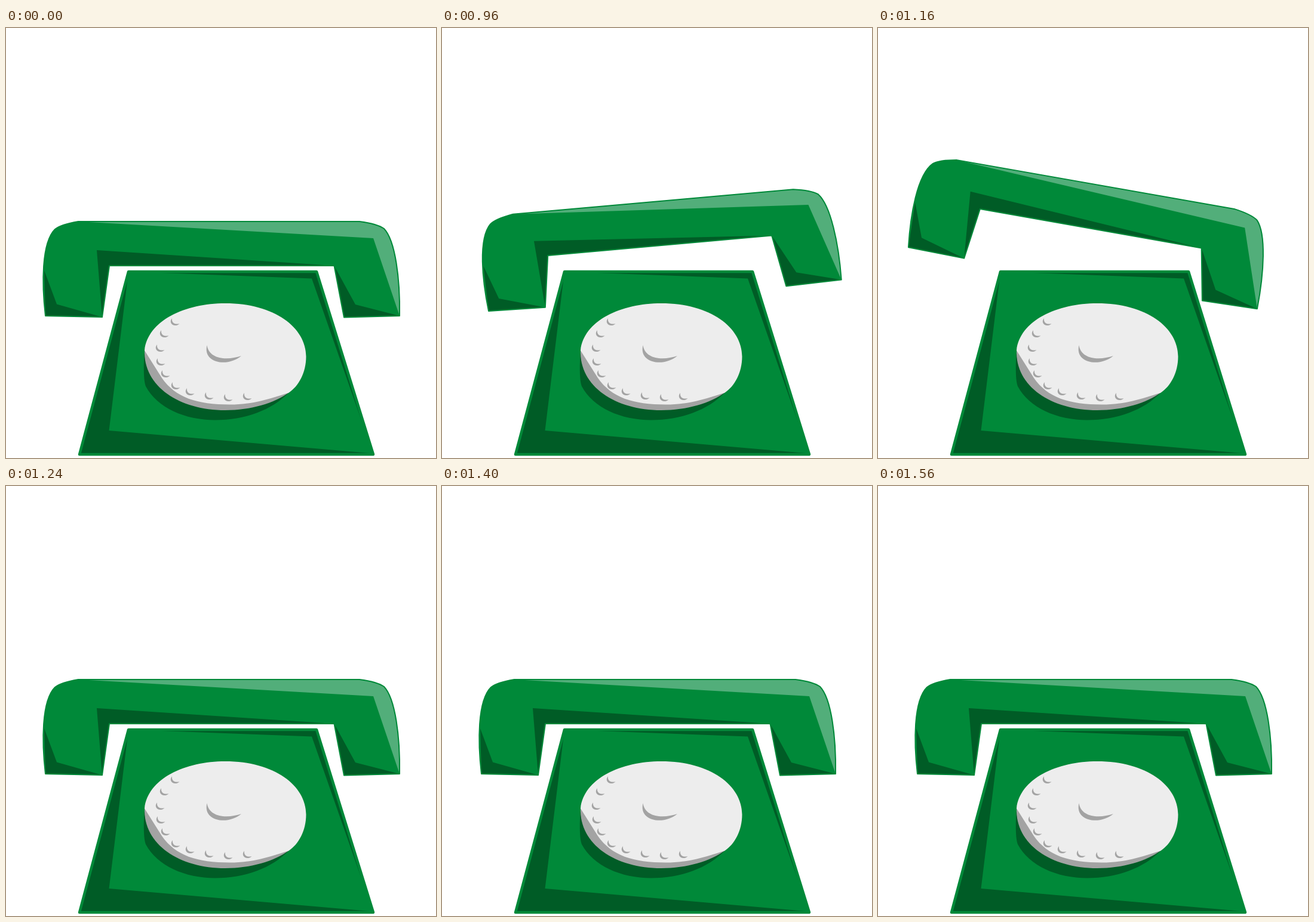
These frames come from a looping animation (720 by 720 pixels, 1920 ms). An HTML page with a canvas:

```html
<!DOCTYPE html>
<html lang="en">
<head>
<meta charset="utf-8">
<title>Ringing telephone</title>
<style>
  html, body { margin: 0; width: 100%; height: 100%; overflow: hidden; background: #fff; }
  canvas { display: block; width: 720px; height: 720px; }
</style>
</head>
<body>
<canvas id="stage" width="720" height="720"></canvas>
<script>
const ctx = document.getElementById('stage').getContext('2d');
const GREEN = '#008939', DARK = '#005c26', LIGHT = '#52ae7a';
const FACE = '#ededed', GREY = '#a3a3a3';

const LOOP = 1920, STEP = 40, RING_START = 920, RING_END = 1560;
const PIVOT = { x: 360.5, y: 404 };
// Extreme poses of the handset: degrees and offset from rest.
const SWINGS = [
  { angle: -10.15, dx: 8, dy: -67.4 },
  { angle: 10, dx: -6, dy: -62.5 }
];

const BASE = new Path2D('M205 408H520L615 714H123Z');
const BASE_SHADE = new Path2D('M205 408L172.500 674L615 712.500L123 713ZM207 408L512 419.500L614 711L520 409Z');

const SHADOW = new Path2D('M231.500 545C230.500 565 230 590 234 600C253 636 300 656.500 350 656.500C400 656.500 445 640 474 610Z');
const RIM = new Path2D('M232 540C230 600 290 640 367 640C410 640 450 628 474 610L367 500Z');
const DIAL = new Path2D('M232 540C237 490 300 461 367 461C450 461 502.500 502 502.500 550C502.500 577 490 600 473 611C440 621 415 630.500 375 630.500C320 630.500 284 619 261 586Z');
const KNOB = new Path2D('M336.500 531C329 562 372 568 394 549C370 557 340 555 336.500 531Z');
const HOLE = new Path2D('M-5 -6C-12 2 -1 11 7.500 3C0 5 -6 2 -5 -6Z');
const HOLES = [
  [283, 492], [265, 512], [258, 536], [259, 559], [267, 579],
  [284, 599], [308, 609], [340, 616], [372, 619], [404, 617]
];

const HANDSET = new Path2D('M66 482C60 430 59 360 82 337Q92 329 121 324H592Q622 328 633 336C652 356 660 420 659 482L566 484.500L549.500 398H173L161 484Z');
const HANDSET_LIGHT = new Path2D('M121 324H592Q622 328 633 336C652 356 660 420 659 482L615 352Z');
const HANDSET_SHADE = new Path2D('M152 372L549.500 398H173L161 484ZM64 406L85 462.500L161 484L66 482ZM549.500 398L585 463L659 482L566 484.500Z');

function fill(path, color) {
  ctx.fillStyle = color;
  ctx.fill(path);
}

function outline(path, width) {
  ctx.strokeStyle = GREEN;
  ctx.lineWidth = width;
  ctx.lineJoin = 'round';
  ctx.stroke(path);
}

function drawBase() {
  fill(BASE, GREEN);
  fill(BASE_SHADE, DARK);
  outline(BASE, 4.5);
  fill(SHADOW, DARK);
  fill(RIM, GREY);
  fill(DIAL, FACE);
  fill(KNOB, GREY);
  for (const [x, y] of HOLES) {
    ctx.save();
    ctx.translate(x, y);
    fill(HOLE, GREY);
    ctx.restore();
  }
}

function drawHandset({ angle, dx, dy }, amount) {
  ctx.save();
  ctx.translate(PIVOT.x + dx * amount, PIVOT.y + dy * amount);
  ctx.rotate(angle * amount * Math.PI / 180);
  ctx.translate(-PIVOT.x, -PIVOT.y);
  fill(HANDSET, GREEN);
  fill(HANDSET_LIGHT, LIGHT);
  fill(HANDSET_SHADE, DARK);
  outline(HANDSET, 2);
  ctx.restore();
}

function draw(ms) {
  const time = Math.floor(ms % LOOP / STEP) * STEP;
  const ringing = time >= RING_START && time < RING_END;
  const beat = ringing ? (time - RING_START) / STEP : 0;
  const phase = beat % 4;
  // Each swing goes halfway, full, halfway, then rests.
  const amount = Math.min(phase, 4 - phase) / 2;

  ctx.fillStyle = '#fff';
  ctx.fillRect(0, 0, 720, 720);
  drawBase();
  drawHandset(SWINGS[Math.floor(beat / 4) % 2], amount);
}

const start = performance.now();
function tick() {
  draw(performance.now() - start);
  requestAnimationFrame(tick);
}
tick();
</script>
</body>
</html>
```
